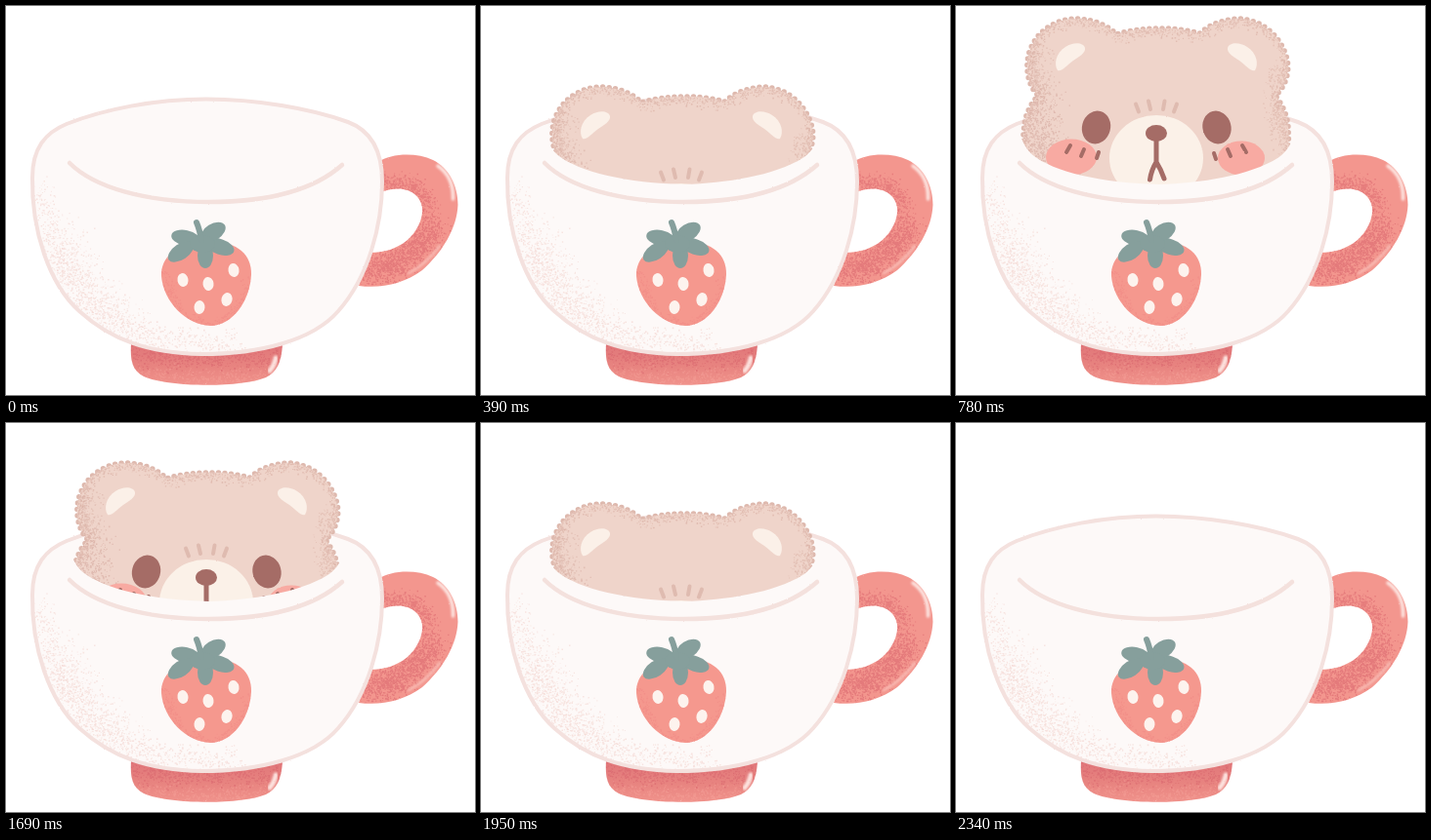
An HTML page for the animation above (2470 ms loop, 480 px wide and 399 px high).

```html
<!DOCTYPE html>
<html lang="en">
<head>
<meta charset="utf-8">
<title>Bear in a cup</title>
<style>
html, body { margin: 0; width: 100%; height: 100%; overflow: hidden; background: #fff; }
svg { display: block; width: 100vw; height: 100vh; }
</style>
</head>
<body>
<svg viewBox="0 0 480 399" xmlns="http://www.w3.org/2000/svg" fill="none" stroke-linecap="round" stroke-linejoin="round">
  <defs>
    <filter id="rough" x="-5%" y="-5%" width="110%" height="110%" color-interpolation-filters="sRGB">
      <feTurbulence type="fractalNoise" baseFrequency=".45" numOctaves="2" seed="4"/>
      <feDisplacementMap in="SourceGraphic" scale="1.6" xChannelSelector="R" yChannelSelector="G"/>
    </filter>
    <filter id="soft" x="-30%" y="-30%" width="160%" height="160%"><feGaussianBlur stdDeviation="1.3"/></filter>
    <linearGradient id="baseFill" x1="0" y1="0" x2="0" y2="1">
      <stop offset="0" stop-color="#e07679"/><stop offset=".55" stop-color="#e88480"/><stop offset="1" stop-color="#f0928b"/>
    </linearGradient>
    <path id="cup" d="M62 121C100 106 152 95.500 205 95.500C255 95.500 312 105 350 119C374 128 385 150 385 180C385 225 371 278 340 313C314 343 260 357 200 357C146 356 108 343 75 313C44 285 26 230 27 176C27 146 40 130 62 121Z"/>
    <path id="base" d="M128 347C127 363 129 374 141 380C165 391 240 392 266 381C277 376 282 365 283 347Z"/>
    <path id="handle" fill-rule="evenodd" d="M381 160C394 151 420 150 437 158C453 166 462.500 184 462.500 204C461.500 228 447 252 426 271C407 285 384 290 361 287L372 253C387 253 400 249 411 240C422 230 427 217 426 207C424 193 412 187 400 187.500C393 188 388 189 384 191Z"/>
    <path id="berry" d="M159 277C158 258 174 244 203 242C236 240 251 254 251 275C250 302 232 328 209 328C184 327 161 303 159 277Z"/>
    <path id="bear" d="M70 210C69 180 67 140 70 122C71 110 78 98 84 92C74 82 70 64 75 47C83 24 103 13 124 13C142 14 156 20 164 29C190 21 224 21 250 28C260 18 276 13 291 13C317 15 334 34 339 55C342 70 336 84 327 92C332 98 339 110 340 124C341 150 341 180 340 210"/>
    <clipPath id="cupClip"><use href="#cup"/></clipPath>
    <clipPath id="baseClip"><use href="#base"/></clipPath>
    <clipPath id="handleClip"><use href="#handle" clip-rule="evenodd"/></clipPath>
    <clipPath id="berryClip"><use href="#berry"/></clipPath>
    <clipPath id="bearClip"><use href="#bear"/></clipPath>
    <clipPath id="mouthOfCup">
      <path d="M0 0H480V125H346C345 140 340 148 330 155.500C300 174.500 250 181.500 208 183C150 181.500 100 170.500 78 152.500C70 145 66 135 64 125H0Z"/>
    </clipPath>
  </defs>

  <g filter="url(#rough)">
    <use href="#handle" fill="#f3968e"/>
    <g id="handleDots"></g>
    <g filter="url(#soft)">
      <path d="M442 164C452 171 458 183 457.500 198" stroke="#fde3df" stroke-width="3.500"/>
      <path d="M412 274C424 268 435 258 444 246" stroke="#f9bdb6" stroke-width="2.500"/>
    </g>
    <use href="#base" fill="url(#baseFill)"/>
    <g id="baseDots"></g>
    <path d="M276 361Q275 368 270 374" stroke="#fde3df" stroke-width="5" filter="url(#soft)"/>
    <use href="#cup" fill="#fdf9f8"/>
    <g id="cupDots"></g>
    <use href="#cup" stroke="#f4e1de" stroke-width="4"/>
    <path d="M65 161C90 186 142 201 208 201C270 201 316 188 344 163" stroke="#f4e1dd" stroke-width="4.500"/>
  </g>

  <g filter="url(#rough)">
    <use href="#berry" fill="#f5988e"/>
    <g id="berryDots"></g>
    <g id="seeds" fill="#fdf3ee"></g>
    <g id="leaves" fill="#869f9c"></g>
    <path d="M195 222Q198 229 200 240" stroke="#869f9c" stroke-width="6"/>
  </g>

  <g clip-path="url(#mouthOfCup)">
    <g id="body">
      <use href="#bear" stroke="#deb9ae" stroke-width="5.500" stroke-dasharray="0 6.500"/>
      <use href="#bear" fill="#efd4ca"/>
      <g id="bearDots"></g>
      <g id="ears" fill="#fbf0e8"></g>
      <g filter="url(#rough)">
        <ellipse cx="205" cy="156" rx="48" ry="44" fill="#fbf1e8"/>
        <ellipse cx="118" cy="155" rx="26" ry="18.500" fill="#f8aaa2"/>
        <ellipse cx="292" cy="156" rx="24" ry="17.500" fill="#f8aaa2"/>
        <path d="M184 100.500L187 108.500M197 97.500L199 106M213.500 97.500L212 106M226 100.500L223 108.500" stroke="#dfbbb0" stroke-width="4"/>
        <g fill="#a56c66">
          <ellipse cx="143.500" cy="124.500" rx="14.500" ry="17" transform="rotate(15 143.500 124.500)"/>
          <ellipse cx="267" cy="124.500" rx="14.500" ry="17" transform="rotate(-15 267 124.500)"/>
          <ellipse cx="205" cy="130.500" rx="11" ry="8.500"/>
        </g>
        <g stroke="#a56c66">
          <path d="M205 136V160Q200 168 198.500 178M205 160Q210 168 213 177" stroke-width="5"/>
          <path d="M117 143L113 150M131 147L128 154M146 150L144 156M264 151L266 157M278 147L281 154M293 143L297 150" stroke-width="4"/>
        </g>
      </g>
    </g>
  </g>
</svg>
<script>
const NS = 'http://www.w3.org/2000/svg';
const $ = id => document.getElementById(id);

let seed = 7;
function rand() {
  seed = (seed * 16807) % 2147483647;
  return seed / 2147483647;
}
const bell = () => rand() + rand() + rand() - 1.5;

function add(parent, tag, attrs) {
  const el = document.createElementNS(NS, tag);
  for (const key in attrs) el.setAttribute(key, attrs[key]);
  $(parent).append(el);
  return el;
}

// Scatter grains around a line, densest on the line itself.
function grain(name, line, count, spread, color, opacity, size = 1.2) {
  const guide = document.createElementNS(NS, 'path');
  guide.setAttribute('d', line);
  const length = guide.getTotalLength();
  let d = '';
  for (let i = 0; i < count; i++) {
    const p = guide.getPointAtLength(rand() * length);
    const x = (p.x + bell() * spread).toFixed(1);
    const y = (p.y + bell() * spread).toFixed(1);
    const s = (size * (0.6 + rand() * 0.8)).toFixed(1);
    d += `M${x} ${y}h${s}v${s}h-${s}z`;
  }
  add(name + 'Dots', 'path', { d, fill: color, opacity, 'clip-path': `url(#${name}Clip)` });
}

function oval(parent, x, y, rx, ry, turn) {
  add(parent, 'ellipse', { cx: x, cy: y, rx, ry, transform: `rotate(${turn} ${x} ${y})` });
}

grain('handle', 'M368 270C395 270 425 250 436 222', 1500, 17, '#d9646c', .55);
grain('handle', 'M384 184C405 178 428 186 431 208', 550, 11, '#d9646c', .5);
grain('base', 'M132 357H278', 900, 15, '#d6606a', .5);
grain('base', 'M135 375Q205 389 268 377', 350, 10, '#f5a49c', .45);
grain('cup', 'M38 190C42 240 58 280 90 310C120 334 170 346 235 347', 900, 14, '#f3d6d0', .6);
grain('cup', 'M55 235C62 270 85 302 120 322', 700, 26, '#f3d6d0', .55);
grain('berry', 'M161 270C164 300 184 326 210 327C228 326 244 305 250 280', 300, 7, '#ee8480', .45);

const outline = $('bear').getAttribute('d');
grain('bear', outline, 2600, 9, '#d9afa4', .6);
grain('bear', 'M82 100C74 120 76 150 100 165', 900, 26, '#d6aba0', .6);
grain('bear', 'M80 45Q76 75 92 92', 350, 15, '#d6aba0', .5);
grain('bear', 'M332 60Q326 90 336 140', 380, 14, '#d9afa4', .5);

[[181, 281, -12], [207, 285, -8], [233, 271, -10], [198, 309, 5], [226, 301, 15]]
  .forEach(([x, y, turn]) => oval('seeds', x, y, 5.5, 7, turn));

[[184, 238, 15, 8, 12], [179, 252, 15, 8, -34], [204, 256, 8, 13, 0], [219, 247, 15, 8, 18], [212, 232, 14, 8.5, -32], [201, 244, 13, 9, 0]]
  .forEach(([x, y, rx, ry, turn]) => oval('leaves', x, y, rx, ry, turn));

const ear = 'M104 66C100 60 102 48 112 42C120 37 130 37 132 43C133 48 126 52 120 56C113 61 108 68 104 66Z';
add('ears', 'path', { d: ear });
add('ears', 'path', { d: ear, transform: 'translate(410) scale(-1 1)' });

const LOOP = 2470, TICK = 130;
const drops = [null, 105, 88, 70, 49, 28, 0];

// Rise in ticks, hold, then sink by the same steps.
function dropAt(ms) {
  const up = Math.floor(ms / TICK);
  const down = Math.floor((LOOP - ms - 0.001) / TICK);
  return drops[Math.min(up, down, 6)];
}

function draw(ms) {
  const drop = dropAt(ms);
  $('body').setAttribute('display', drop === null ? 'none' : 'inline');
  $('body').setAttribute('transform', `translate(0 ${drop || 0})`);
}

let start = null;
function frame(now) {
  if (start === null) start = now;
  draw((now - start) % LOOP);
  requestAnimationFrame(frame);
}
draw(0);
requestAnimationFrame(frame);
</script>
</body>
</html>
```
